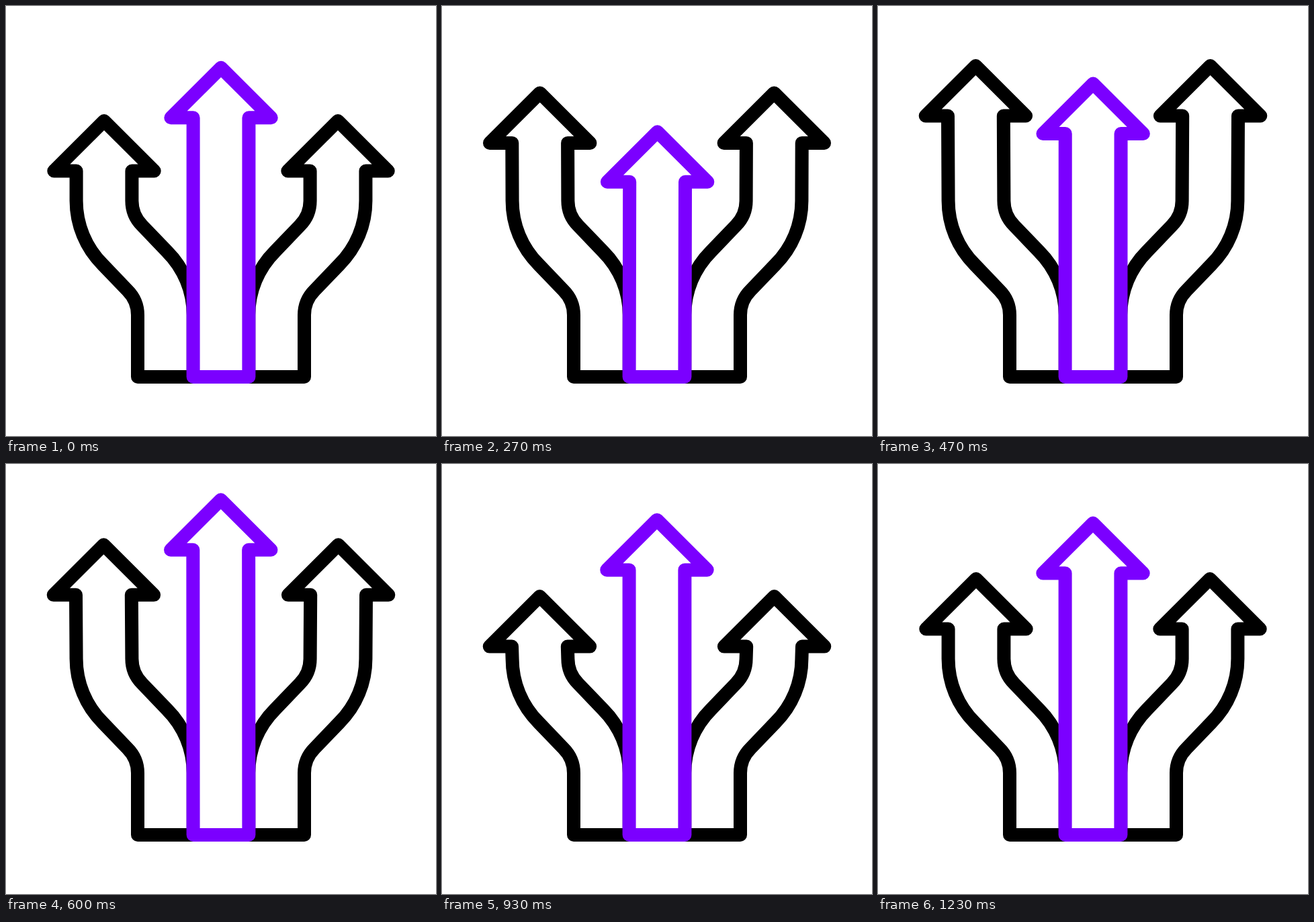
These frames come from a looping animation (640 by 640 pixels, 1.67 s). An HTML page with a canvas:

```html
<!DOCTYPE html>
<html>
<head>
<meta charset="utf-8">
<title>Three arrows</title>
<style>
  html, body { margin: 0; width: 100%; height: 100%; overflow: hidden; background: #fff; }
  canvas { display: block; }
</style>
</head>
<body>
<canvas id="stage" width="640" height="640"></canvas>
<script>
const ctx = document.getElementById('stage').getContext('2d');
const LOOP = 1670, FPS = 30, LAST_STEP = 37;
const STEM = 41.4, WING = 74.7, HEAD = 74.5, FLOOR = 552;

// Keys: [step, top edge of the arrow, sideways drift]
const MIDDLE = [[-1.3, 78, 0], [8.1, 177.3, 0.6], [19.75, 36.9, -0.3], [30.6, 78, 0]];
const SIDE = [[3, 161, 0], [13, 77.8, 0.6], [26.3, 188.5, 0.6], [37, 161, 0]];

// Ease-in-out, cubic-bezier(.42, 0, .58, 1)
function ease(x) {
  let lo = 0, hi = 1;
  for (let i = 0; i < 24; i++) {
    const p = (lo + hi) / 2, q = 1 - p;
    if (1.26 * p * q * q + 1.74 * p * p * q + p * p * p < x) lo = p;
    else hi = p;
  }
  return lo * lo * (3 - 2 * lo);
}

function pose(keys, step) {
  const next = keys.findIndex(key => key[0] > step);
  if (next <= 0) {
    const [, top, drift] = next < 0 ? keys[keys.length - 1] : keys[0];
    return { top, drift };
  }
  const a = keys[next - 1], b = keys[next];
  const k = ease((step - a[0]) / (b[0] - a[0]));
  return { top: a[1] + (b[1] - a[1]) * k, drift: a[2] + (b[2] - a[2]) * k };
}

// From the left stem, around the head, to the right stem
function head(x, top) {
  const base = top + HEAD + 10;
  ctx.lineTo(x - STEM, base);
  ctx.lineTo(x - WING, base);
  ctx.lineTo(x, base - HEAD);
  ctx.lineTo(x + WING, base);
  ctx.lineTo(x + STEM, base);
}

function finish(color) {
  ctx.closePath();
  ctx.fillStyle = '#fff';
  ctx.fill();
  ctx.strokeStyle = color;
  ctx.stroke();
}

function sideArrow({ top, drift }) {
  const x = 146, foot = 237.4, bendTop = 290, bendEnd = 460;
  const wide = 134, tight = 52, eighth = Math.PI / 4;
  const left = x - STEM, right = x + STEM;
  ctx.beginPath();
  ctx.moveTo(foot - STEM, FLOOR);
  ctx.arc(foot - STEM - tight, bendEnd, tight, 0, -eighth, true);
  ctx.arc(left + wide, bendTop, wide, 3 * eighth, 4 * eighth);
  head(x - drift, top);
  ctx.arc(right + tight, bendTop, tight, 4 * eighth, 3 * eighth, true);
  ctx.arc(foot + STEM - wide, bendEnd, wide, -eighth, 0);
  ctx.lineTo(foot + STEM, FLOOR);
  finish('#000');
}

function middleArrow({ top, drift }) {
  ctx.beginPath();
  ctx.moveTo(320 - STEM, FLOOR);
  head(320 + drift, top);
  ctx.lineTo(320 + STEM, FLOOR);
  finish('#7b00ff');
}

function draw(ms) {
  const step = Math.min(LAST_STEP, Math.floor(ms * FPS / 1000 + 0.15));
  const side = pose(SIDE, step);
  ctx.fillStyle = '#fff';
  ctx.fillRect(0, 0, 640, 640);
  ctx.lineWidth = 20;
  ctx.lineJoin = 'round';
  sideArrow(side);
  ctx.save();
  ctx.translate(640, 0);
  ctx.scale(-1, 1);
  sideArrow(side);
  ctx.restore();
  middleArrow(pose(MIDDLE, step));
}

const start = performance.now();
function tick() {
  draw((performance.now() - start) % LOOP);
  requestAnimationFrame(tick);
}
tick();
</script>
</body>
</html>
```
